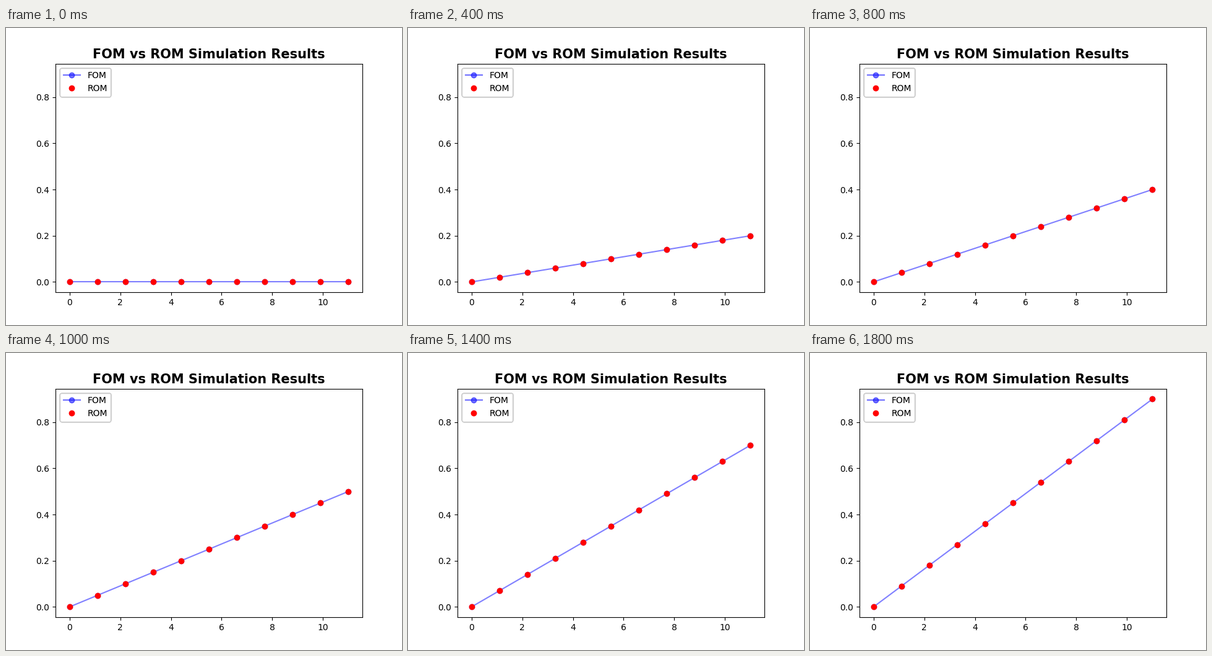
A matplotlib script for the animation above (2000 ms loop, 640 px wide and 480 px high).

```python
import numpy as np
import matplotlib.pyplot as plt
from matplotlib.animation import FuncAnimation

FRAMES = 10
STEP = 0.1
LEGEND_LAYERS = 10

plt.rcParams["font.family"] = "DejaVu Sans"

x = np.linspace(0, 11, 11)
shape = x / x[-1]

fig, ax = plt.subplots(figsize=(6.4, 4.8), dpi=100)
ax.set_xlim(-0.55, 11.55)
ax.set_ylim(-0.045, 0.945)
ax.set_title("FOM vs ROM Simulation Results", fontsize=15, fontweight="bold")

fom, = ax.plot(x, 0 * x, "bo-", alpha=0.5, label="FOM")
rom, = ax.plot(x, 0 * x, "ro", label="ROM")

# Stacked translucent legends give the heavier box outline.
for _ in range(LEGEND_LAYERS):
    ax.add_artist(ax.legend(loc="upper left"))


def update(i):
    y = STEP * i * shape
    fom.set_ydata(y)
    rom.set_ydata(y)
    return fom, rom


anim = FuncAnimation(fig, update, frames=FRAMES, interval=200,
                     repeat=True, repeat_delay=0, blit=False)

plt.show()
```
